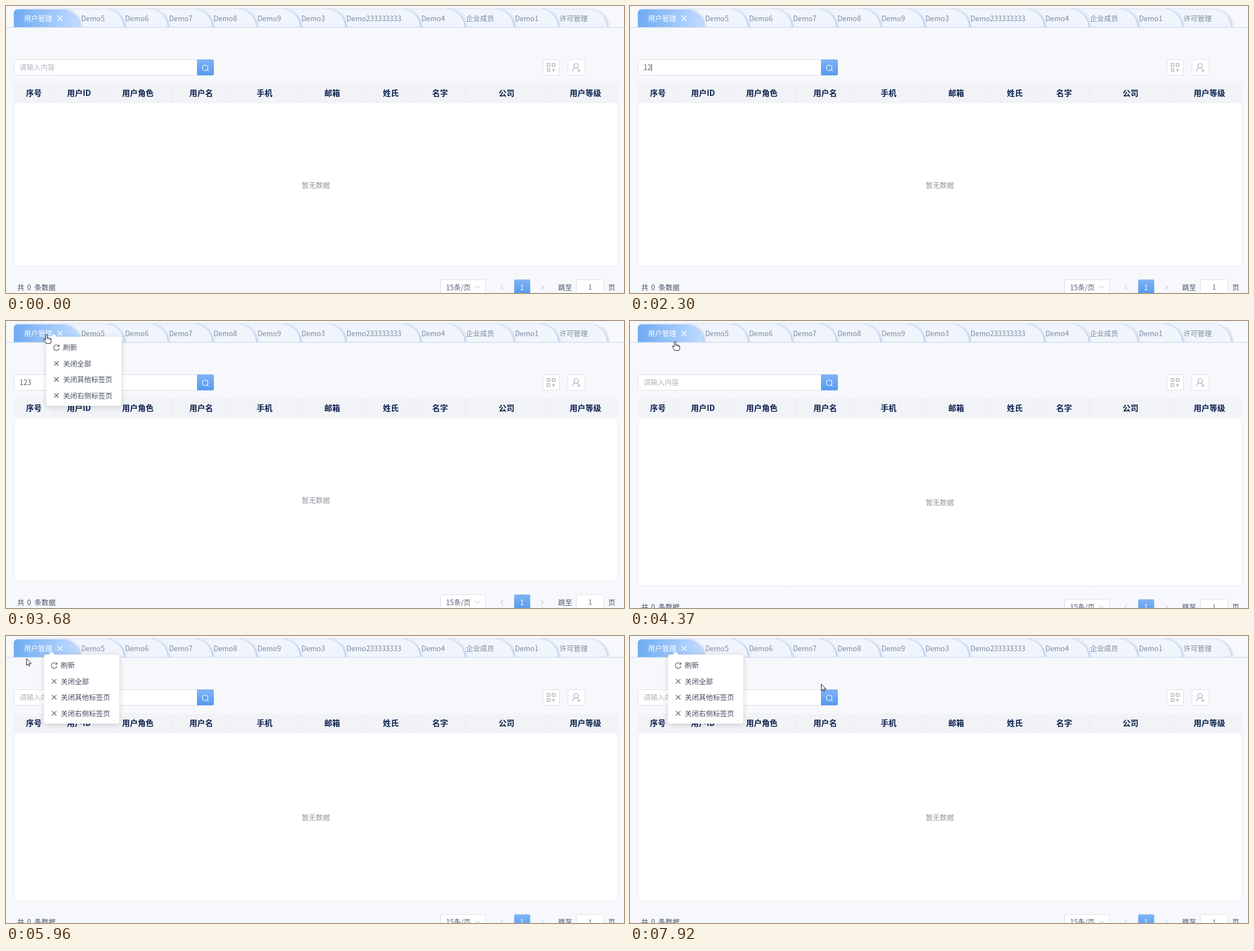
These frames come from a looping animation (1097 px wide and 511 px high, 8 s). An HTML page with a canvas:

```html
<!DOCTYPE html>
<html lang="zh-CN">
<head>
<meta charset="utf-8">
<style>
html, body { margin: 0; width: 100%; height: 100%; overflow: hidden; background: #f7f8fb; }
canvas { display: block; }
</style>
</head>
<body>
<canvas id="stage" width="1097" height="511"></canvas>
<script>
const ctx = document.getElementById('stage').getContext('2d');
const LOOP = 8000;
const FONT = '"Noto Sans CJK SC", "Noto Sans CJK", "Noto Sans", sans-serif';
const BORDER = '#dcdfe6';
const TABS = [['用户管理', 131], ['Demo5', 209], ['Demo6', 287], ['Demo7', 366], ['Demo8', 444],
  ['Demo9', 522], ['Demo3', 602], ['Demo233333333', 735], ['Demo4', 814], ['企业成员', 901],
  ['Demo1', 980], ['许可管理', 1067]];
const COLUMNS = [['序号', 85], ['用户ID', 174], ['用户角色', 294], ['用户名', 399], ['手机', 519],
  ['邮箱', 639], ['姓氏', 727], ['名字', 814], ['公司', 963], ['用户等级', 1094]];
const ITEMS = ['刷新', '关闭全部', '关闭其他标签页', '关闭右侧标签页'];
const ROW = 28.5;

// Pointer route: time, x, y
const ROUTE = [[210, 935, 480], [450, 520, 260], [650, 170, 90], [800, 24, 48], [990, 70, 82],
  [1250, 95, 111], [2610, 95, 111], [2800, 92, 80], [3070, 72, 23.5], [3750, 72, 23.5],
  [3910, 80, 36], [4720, 80, 36], [5100, 67, 28], [5600, 67, 28], [5950, 36, 40], [6430, 52, 52],
  [6840, 76, 70.5], [7100, 86, 112], [7310, 87, 108], [7450, 150, 84], [7540, 212, 71],
  [7640, 340, 80], [7740, 455, 92], [7900, 339.5, 85.5], [8000, 339.5, 85.5]];
const CLICKS = [[1530, 1670], [3220, 3370], [4230, 4300], [5100, 5260]];

function text(str, x, cy, color, size = 12.5, align = 'left', weight = 400) {
  ctx.font = `${weight} ${size}px ${FONT}`;
  ctx.textAlign = align;
  ctx.fillStyle = color;
  ctx.fillText(str, x, cy + size * 0.37);
}

function box(x, y, w, h, fill, stroke, radius = 0) {
  ctx.beginPath();
  ctx.roundRect(x, y, w, h, radius);
  if (fill) { ctx.fillStyle = fill; ctx.fill(); }
  if (stroke) { ctx.strokeStyle = stroke; ctx.lineWidth = 1; ctx.stroke(); }
}

function stroke(path, x, y, color, width = 1) {
  ctx.save();
  ctx.translate(x, y);
  ctx.strokeStyle = color;
  ctx.lineWidth = width;
  ctx.stroke(new Path2D(path));
  ctx.restore();
}

function cross(x, y, r, color, width) {
  stroke(`M${-r} ${-r}L${r} ${r}M${r} ${-r}L${-r} ${r}`, x, y, color, width);
}

function gradient(x0, y0, x1, y1, from, to) {
  const g = ctx.createLinearGradient(x0, y0, x1, y1);
  g.addColorStop(0, from);
  g.addColorStop(1, to);
  return g;
}

function shadow(color, blur, dx = 0, dy = 0) {
  ctx.shadowColor = color;
  ctx.shadowBlur = blur;
  ctx.shadowOffsetX = dx;
  ctx.shadowOffsetY = dy;
}

// cubic-bezier(.55, 0, .1, 1)
function ease(p) {
  if (p <= 0) return 0;
  if (p >= 1) return 1;
  let lo = 0, hi = 1, s;
  for (let i = 0; i < 20; i++) {
    s = (lo + hi) / 2;
    const x = 1.65 * (1 - s) ** 2 * s + 0.3 * (1 - s) * s * s + s ** 3;
    if (x < p) lo = s; else hi = s;
  }
  return 3 * s * s - 2 * s ** 3;
}

function drawTabs() {
  ctx.save();
  ctx.beginPath();
  ctx.rect(0, 0, 1097, 38);
  ctx.clip();
  for (let i = TABS.length - 1; i >= 0; i--) {
    const [label, right] = TABS[i];
    const left = i ? TABS[i - 1][1] - 32 : 14;
    ctx.save();
    shadow('rgba(80,130,205,.5)', 5, 2, 1);
    ctx.beginPath();
    ctx.moveTo(left, 38);
    ctx.lineTo(left, i ? 6 : 13);
    if (!i) ctx.quadraticCurveTo(left, 6, left + 7, 6);
    ctx.lineTo(right - 32, 6);
    ctx.ellipse(right - 32, 38, 32, 32, 0, -Math.PI / 2, 0);
    ctx.closePath();
    ctx.fillStyle = i ? '#f0f4fc' : gradient(14, 0, 131, 0, '#6fabf3', '#c1dbff');
    ctx.fill();
    ctx.restore();
    if (i) text(label, TABS[i - 1][1] + 2.5, 22, '#7b899d');
  }
  text('用户管理', 32, 22, '#fff', 12.5, 'left', 500);
  cross(95.5, 22, 4.5, '#fff', 1.3);
  ctx.restore();
  box(0, 37.5, 1097, 1, '#c3d5ee');
}

function drawToolbar(value, hovered, caret) {
  box(14.5, 95.5, 325, 28, '#fff', hovered ? '#b9bec8' : BORDER, [3, 0, 0, 3]);
  text(value || '请输入内容', 24, 109, value ? '#5a6275' : '#b0b5bf');
  if (caret) box(24 + value.length * 6.94, 103, 1, 13, '#444');
  box(339, 95, 30, 28.5, gradient(0, 95, 0, 124, '#80b4f6', '#5398ef'), null, [0, 3, 3, 0]);
  stroke('M5 0A5 5 0 1 1 -5 0A5 5 0 1 1 5 0M3.6 3.6L6.3 6.3', 353.5, 110, '#fff', 1.1);

  box(953.5, 95.5, 29, 28, '#fff', BORDER, 3);
  stroke('M-7 -7h5v5h-5zM2 -7h5v5h-5zM-7 2h5v5h-5zM4.5 1.5v6M1.5 4.5h6', 967.5, 109.5, '#a5a9b2', 1.2);
  box(997.5, 95.5, 30, 28, '#fff', BORDER, 3);
  stroke('M4 -3A4 4 0 1 1 -4 -3A4 4 0 1 1 4 -3M-6.5 7Q-6 2 -2 .8M2 .8L4 2.5M5 3v5M2.5 5.5h5',
    1012, 109.5, '#a5a9b2', 1.2);
}

function drawTable(grow) {
  box(14.5, 138.5, 1071, 324.5 + grow, '#fff', '#e9ecf2');
  box(14, 138, 1072, 35, '#f1f3f7');
  let left = 14;
  COLUMNS.forEach(([label, right], i) => {
    text(label, (left + right) / 2, 155, '#0c204c', 14, 'center', 700);
    if (i < 9) box(right - 0.5, 138, 1, 35, '#e8ebf1');
    left = right;
  });
  text('暂无数据', 550, 319 + grow / 2, '#8f939b', 12.5, 'center');
}

function drawFooter(grow) {
  const ink = '#46506a';
  ctx.save();
  ctx.translate(0, grow);
  text('共', 20, 501, ink);
  text('0', 41, 501, ink, 12.5, 'center');
  text('条数据', 50.5, 501, ink);
  box(771.5, 487.5, 80, 28, '#fff', BORDER, 3);
  text('15条/页', 781, 501, '#5a6275');
  stroke('M-4.5 -2.3L0 2.3L4.5 -2.3', 837, 500.5, '#b4b8c1');
  stroke('M2 -4L-2 0L2 4', 880.5, 501, '#a9adb7');
  stroke('M-2 -4L2 0L-2 4', 952, 501, '#a9adb7');
  box(902, 487, 28.5, 28.5, gradient(0, 487, 0, 515, '#80b4f6', '#5398ef'), null, 2);
  text('1', 916, 501, '#fff', 12.5, 'center');
  text('跳至', 980, 501, ink);
  box(1012.5, 487.5, 49, 28, '#fff', BORDER, 3);
  text('1', 1037, 501, '#5a6275', 11.5, 'center');
  text('页', 1069, 501, ink);
  ctx.restore();
}

function menuState(t) {
  if (t >= 3380 && t < 4370) {
    return { x: 71.5, y: 28, show: t < 4200 ? ease((t - 3380) / 300) : 1 - ease((t - 4200) / 170) };
  }
  if (t >= 5270) return { x: 67.5, y: 33, show: ease((t - 5270) / 300) };
  return null;
}

function inMenu(menu, p) {
  return menu && p && p.x > menu.x && p.x < menu.x + 134 && p.y > menu.y && p.y < menu.y + 123;
}

function drawMenu(menu, p) {
  const { x, y, show } = menu;
  const hover = inMenu(menu, p) ? Math.floor((p.y - y - 5) / ROW) : -1;
  ctx.save();
  ctx.globalAlpha = show;
  ctx.translate(x + 67, y);
  ctx.scale(show, 1);
  ctx.translate(-67, 0);
  ctx.save();
  shadow('rgba(0,0,0,.16)', 10, 0, 2);
  box(0, 0, 133.5, 123, '#fff', null, 4);
  ctx.restore();
  ctx.fillStyle = '#fff';
  ctx.fill(new Path2D('M8 .5L13.5 -5.5L19 .5Z'));
  ITEMS.forEach((label, i) => {
    const cy = 19.5 + i * ROW;
    const color = i === hover ? '#2377d8' : '#464d60';
    if (i === hover) box(4, cy - 14.2, 126, ROW, '#f0f5fe');
    if (i) cross(18, cy - 0.3, 4, color, 1.1);
    else stroke('M4.2 -2.8A5 5 0 1 0 5 1M4.8 -5.5V-2.3H1.6', 18, cy, color, 1.1);
    text(label, 29.7, cy, color);
  });
  ctx.restore();
}

function pointerAt(t) {
  if (t < 210 || (t >= 1990 && t < 2610)) return null;
  const i = ROUTE.findIndex(k => k[0] > t);
  const [t0, x0, y0] = ROUTE[i - 1];
  const [t1, x1, y1] = ROUTE[i];
  const f = (t - t0) / (t1 - t0);
  return { x: x0 + (x1 - x0) * f, y: y0 + (y1 - y0) * f };
}

function overInput(p) {
  return p && p.x > 14 && p.x < 339 && p.y > 95 && p.y < 124;
}

const HAND = 'M-1.5 1Q0 -.7 1.5 1V6.3Q3.6 5.3 4.2 7.2Q6.2 6.3 6.6 8.2Q8.3 7.6 8.3 9.8V12' +
  'Q8.3 14 7 16.5H-.8Q-1.2 14.5 -4 11.2Q-5.6 9 -4.2 8.3Q-3 7.8 -1.5 10Z';
const FINGERS = 'M1.5 6.3V9M4.2 7.2V9.5M6.6 8.2V10';
const ARROW = 'M0 0V12L2.8 9.4L4.5 13.3L6.3 12.5L4.6 8.8H8.4Z';
const IBEAM = 'M-2.5 -6H-.5L0 -5.5L.5 -6H2.5M0 -5.5V5.5M-2.5 6H-.5L0 5.5L.5 6H2.5';

function drawPointer(p, menu) {
  const onMenu = inMenu(menu, p);
  if (overInput(p) && !onMenu) {
    stroke(IBEAM, p.x + 0.5, p.y, '#222', 1.2);
    return;
  }
  const onTab = p.y < 38 && p.x > 14 && p.x < 1067;
  const onButton = p.x >= 339 && p.x < 369 && p.y > 95 && p.y < 124;
  const hand = onMenu || onTab || onButton;
  const shape = hand ? HAND : ARROW;
  ctx.save();
  ctx.translate(p.x, p.y);
  ctx.fillStyle = '#fff';
  ctx.fill(new Path2D(shape));
  ctx.restore();
  stroke(hand ? shape + FINGERS : shape, p.x, p.y, '#1c1c24', 1);
}

function draw(t) {
  const refreshed = t >= 4230;
  const grow = refreshed ? 8.5 : 0;
  const typed = refreshed ? 0 : [1990, 2220, 2450].filter(k => t >= k).length;
  const p = pointerAt(t);
  const menu = menuState(t);
  const hovered = overInput(p) && !inMenu(menu, p) && t < 1600;

  box(0, 0, 1097, 511, '#f7f8fb');
  drawTabs();
  drawToolbar('123'.slice(0, typed), hovered, t >= 1600 && t < 2610);
  drawTable(grow);
  drawFooter(grow);
  if (menu) drawMenu(menu, p);
  if (p) {
    if (CLICKS.some(([from, to]) => t >= from && t < to)) {
      box(p.x - 10.5, p.y - 10.5, 21, 21, 'rgba(238,232,40,.72)', null, 10.5);
    }
    drawPointer(p, menu);
  }
}

const start = performance.now();
function tick() {
  draw((performance.now() - start) % LOOP);
  requestAnimationFrame(tick);
}
tick();
</script>
</body>
</html>
```
